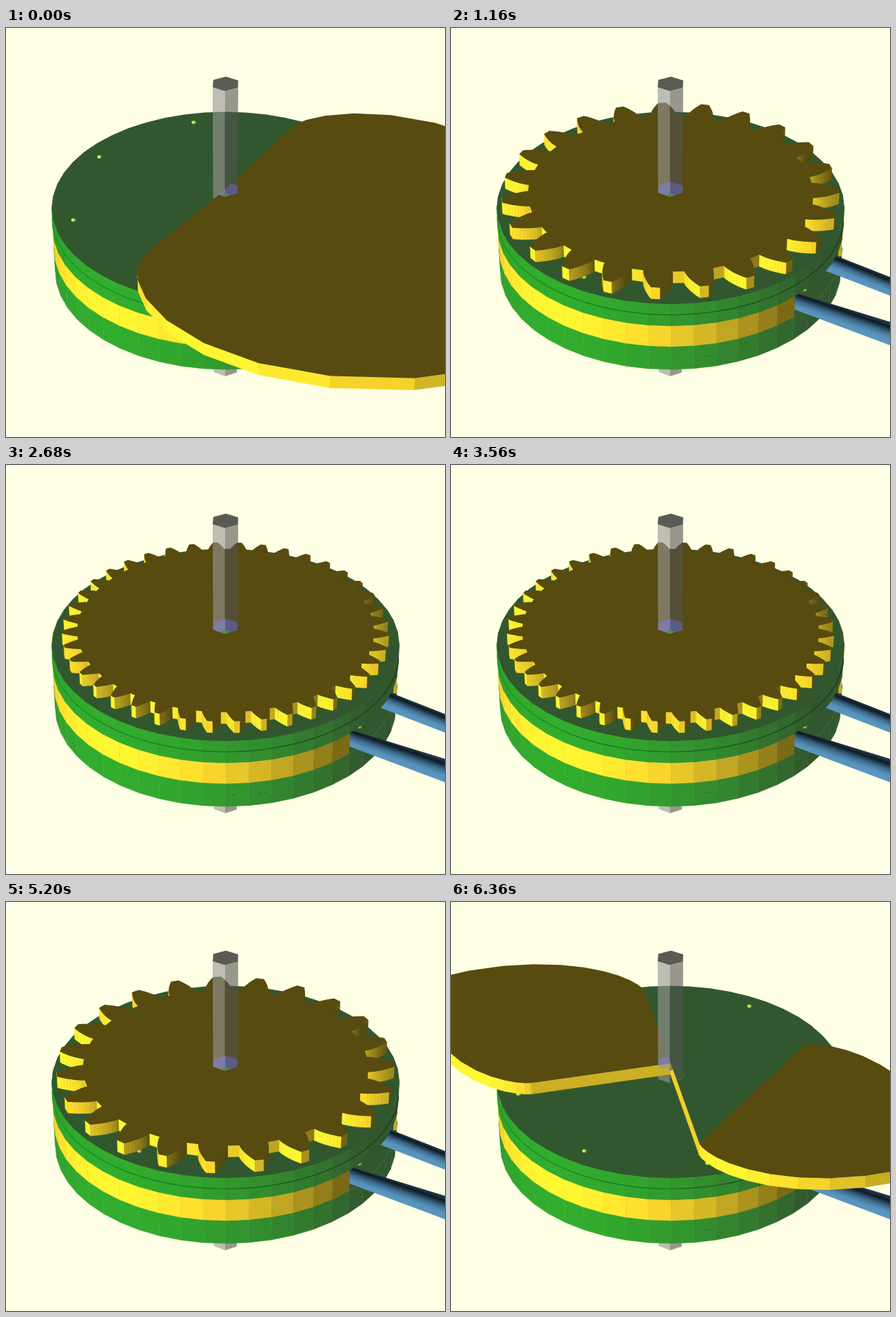
These frames come from a looping animation (637x593 px, 6400 ms). An HTML page with a canvas:

```html
<!DOCTYPE html>
<html lang="en">
<head>
<meta charset="utf-8">
<title>Gear with a changing number of teeth</title>
<style>
  html, body { margin: 0; width: 637px; height: 593px; overflow: hidden; background: #ffffe5; }
  canvas { display: block; }
</style>
</head>
<body>
<canvas id="stage" width="637" height="593"></canvas>
<script>
const ctx = document.getElementById('stage').getContext('2d');
const RAD = Math.PI / 180;
const LOOP = 6400, TICK = 40;

// Camera
const DIST = 3073, TILT = 55.7 * RAD, SPIN = -32.2;
const C = Math.cos(TILT), S = Math.sin(TILT);

// Model
const PLATE = 249, FACETS = 50, STEP = 360 / FACETS;
const PITCH = 223, BASE = PITCH * Math.cos(25 * RAD);
const GEAR_TOP = 75, GEAR_BOTTOM = 56;
const PLATE_TOP = 54, RING_TOP = 17.5, RING_BOTTOM = -17.6, PLATE_BOTTOM = -57;
const ROD = 20, ROD_END = 249;

const project = ([x, y], z) => {
  const k = DIST / (DIST - z * C + y * S);
  return [318.5 + x * k, 296.5 - (y * C + z * S) * k];
};
const polar = (r, deg) => [r * Math.cos(deg * RAD), r * Math.sin(deg * RAD)];

function trace(points) {
  ctx.beginPath();
  points.forEach(([x, y]) => ctx.lineTo(x, y));
  ctx.closePath();
}
function fill(points, color, seam) {
  trace(points);
  ctx.fillStyle = color;
  ctx.fill();
  if (seam) {
    ctx.strokeStyle = color;
    ctx.lineWidth = 0.5;
    ctx.stroke();
  }
}

// Light comes from the lower left, in front of the scene
const light = deg => 0.35 + 0.8 * Math.max(0, Math.sin((50 - deg - 90) * RAD));
const yellow = f => `rgb(${Math.min(255, 249 * f)},${Math.min(255, 215 * f)},${44 * f})`;
const green = f => `rgb(50,${50 + 107 * f},46)`;

const wall = (a, b, top, bottom) =>
  [project(a, top), project(b, top), project(b, bottom), project(a, bottom)];

function disc(z) {
  const rim = [];
  for (let i = 0; i < FACETS; i++) rim.push(project(polar(PLATE, SPIN + i * STEP), z));
  fill(rim, green(0.35));
}

function band(top, bottom, paint, skip = () => false) {
  for (let i = -21; i <= 6; i++) {
    if (skip(i)) continue;
    const a = SPIN + i * STEP;
    fill(wall(polar(PLATE, a), polar(PLATE, a + STEP), top, bottom), paint(light(a + STEP / 2)), true);
  }
}

function dot(deg, z) {
  const [x, y] = project(polar(PITCH - 1, deg), z);
  const spot = (dx, rx, ry, color) => {
    ctx.beginPath();
    ctx.ellipse(x + dx, y - 0.8, rx, ry, 0, 0, 7);
    ctx.fillStyle = color;
    ctx.fill();
  };
  spot(1, 3.6, 2.8, '#668f32');
  spot(0.2, 2.4, 2.1, '#c5ee67');
}

function cord(points, x0, y0, x1, y1) {
  const g = ctx.createLinearGradient(x0, y0, x1, y1);
  g.addColorStop(0, '#22394c');
  g.addColorStop(0.18, '#0f1a24');
  g.addColorStop(0.45, '#3c6a8a');
  g.addColorStop(0.7, '#5792bb');
  g.addColorStop(1, '#5a97c1');
  fill(points, g);
}

function seamLine() {
  const g = ctx.createLinearGradient(70, 0, 560, 0);
  g.addColorStop(0, '#149a1d');
  g.addColorStop(0.5, '#10701a');
  g.addColorStop(0.8, '#164a1a');
  g.addColorStop(1, '#183a18');
  ctx.beginPath();
  for (let a = -177; a <= -6; a += 3) ctx.lineTo(...project(polar(PLATE, a), 36));
  ctx.strokeStyle = g;
  ctx.lineWidth = 1.4;
  ctx.stroke();
}

function rodSides(top, bottom) {
  [[-120, '150,150,150,.62'], [-60, '82,82,82,.6'], [0, '82,82,82,.6']].forEach(([a, tone]) => {
    fill(wall(polar(ROD, SPIN + a), polar(ROD, SPIN + a + 60), top, bottom), `rgba(${tone})`);
  });
}
const hexagon = z => [0, 60, 120, 180, 240, 300].map(a => project(polar(ROD, SPIN + a), z));

function body() {
  rodSides(0, -ROD_END);
  band(RING_BOTTOM, PLATE_BOTTOM, green);
  disc(RING_BOTTOM);
  dot(SPIN, RING_BOTTOM);
  fill([[562, 308], [567, 300], [567, 331], [562, 331]], '#c9a529');
  cord([[520, 343], [540, 323], [637, 361], [637, 388]], 605, 348, 595, 373);
  cord([[490, 381], [637, 426], [637, 460], [490, 405]], 574, 406, 564, 435);
  band(RING_TOP, RING_BOTTOM, yellow, i => i >= -2);
  band(PLATE_TOP, RING_TOP, green);
  seamLine();
  disc(PLATE_TOP);
  for (let a = 0; a < 360; a += 45) dot(SPIN + a, PLATE_TOP);
  ctx.fillStyle = '#14401a';
  [[329, 478], [369, 475], [376, 474]].forEach(([x, y]) => ctx.fillRect(x, y, 1.5, 1));
}

// Involute tooth: radius and turn for a roll angle u
const rollAt = r => Math.sqrt(Math.max(0, (r / BASE) ** 2 - 1));
const turn = u => (u - Math.atan(u)) / RAD;

function tooth(n, index) {
  const mid = SPIN + index * 360 / n;
  const root = Math.max(0, PITCH * (1 - 2 / n));
  const half = 90 / n + turn(rollAt(PITCH));
  const from = rollAt(root), to = rollAt(PITCH * (1 + 1.86 / n));
  const flank = [];
  for (let i = 0; i <= 12; i++) {
    const u = from + (to - from) * i / 12;
    flank.push([BASE * Math.hypot(1, u), half - turn(u)]);
  }
  if (root < BASE) flank.unshift([root, half]);
  const points = [
    ...flank.map(([r, a]) => polar(r, mid - a)),
    ...flank.reverse().map(([r, a]) => polar(r, mid + a))
  ];
  // Rounded root for wide gaps
  const gap = 360 / n - 2 * half;
  if (n > 2 && n < 9) {
    for (let i = 1; i < 4; i++) points.push(polar(root, mid + half + gap * i / 4));
  }
  return points;
}

// Draws the gear and returns the outlines of its top faces
function gear(n) {
  const teeth = Array.from({ length: n }, (_, i) => tooth(n, i));
  const outline = teeth.flat();
  const walls = [];
  outline.forEach((a, i) => {
    const b = outline[(i + 1) % outline.length];
    const dx = b[0] - a[0], dy = b[1] - a[1];
    if (Math.hypot(dx, dy) < 0.01) return;
    const q = wall(a, b, GEAR_TOP, GEAR_BOTTOM);
    const facing = (q[1][0] - q[0][0]) * (q[3][1] - q[0][1]) - (q[1][1] - q[0][1]) * (q[3][0] - q[0][0]);
    if (facing > 0) walls.push({ q, depth: a[1] + b[1], tone: light(Math.atan2(-dx, dy) / RAD) });
  });
  walls.sort((a, b) => b.depth - a.depth);
  walls.forEach(w => fill(w.q, yellow(w.tone), true));

  // With two teeth the first one has an open wedge towards the axis
  const faces = n === 2 ? [teeth[0].slice(1, -1), teeth[1]] : [outline];
  return faces.map(face => {
    const top = face.map(p => project(p, GEAR_TOP));
    fill(top, '#574b10');
    return top;
  });
}

// Where the rod enters the gear
function hole(face) {
  ctx.save();
  trace(face);
  ctx.clip();
  trace(hexagon(GEAR_TOP));
  ctx.clip();
  ctx.fillStyle = '#7d7da5';
  ctx.fillRect(290, 215, 28, 40);
  ctx.fillStyle = '#5b5b85';
  ctx.fillRect(318, 215, 28, 40);
  fill([[312, 242], [318, 239], [325, 242], [318, 245]], '#4f8a5c');
  ctx.restore();
}

function draw(n) {
  ctx.fillStyle = '#ffffe5';
  ctx.fillRect(0, 0, 637, 593);
  body();
  if (n < 3) {
    rodSides(GEAR_TOP, PLATE_TOP);
    ctx.beginPath();
    ctx.ellipse(329, 251, 9, 7, 0, -1.5, 1.5);
    ctx.strokeStyle = '#2b8a2c';
    ctx.lineWidth = 1;
    ctx.stroke();
  }
  const faces = gear(n);
  rodSides(ROD_END, GEAR_TOP);
  faces.forEach(hole);
  fill(hexagon(ROD_END), '#5b5b55');
}

let shown = 0;
const start = performance.now();
function frame() {
  const t = (performance.now() - start) % LOOP;
  const phase = Math.floor(t / TICK) * TICK / LOOP;
  const n = 1 + Math.round(40 * Math.sin(Math.PI * phase));
  if (n !== shown) draw(shown = n);
  requestAnimationFrame(frame);
}
frame();
</script>
</body>
</html>
```
